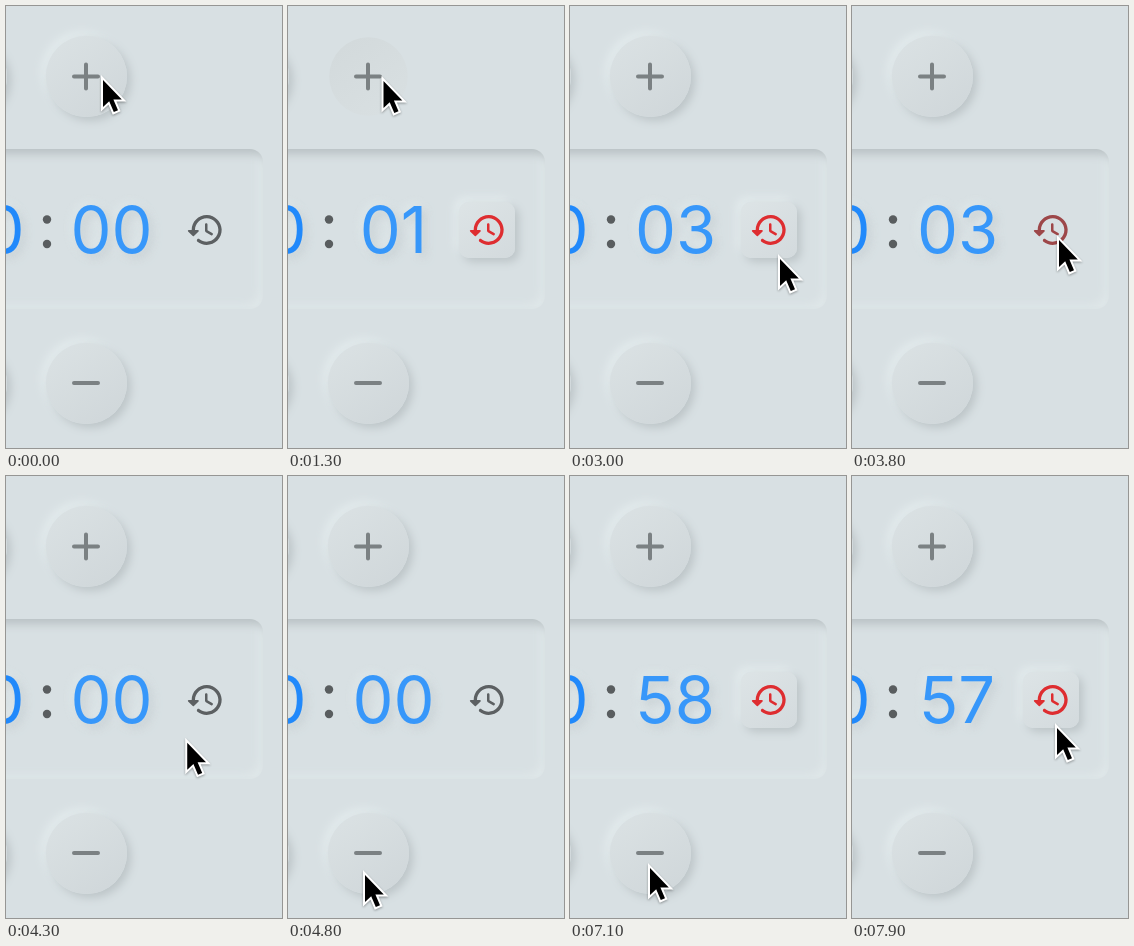
Recreate the animation shown at these times as an HTML page. Size 276 by 442 pixels, loop 8 s.

```html
<!DOCTYPE html>
<html lang="en">
<head>
<meta charset="utf-8">
<title>Timer</title>
<style>
  html, body { margin: 0; width: 100%; height: 100%; overflow: hidden; background: #d8e0e3; }
  div, svg { position: absolute; }
  svg { left: 0; top: 0; }
  .panel {
    left: -200px; top: 143px; width: 457px; height: 160px; border-radius: 13px;
    box-shadow: inset 5px 6px 10px -1px #b9c1c4, inset -6px -6px 9px -2px #dfe7e9;
  }
  .round, .flat { width: 81px; height: 81px; border-radius: 50%; }
  .round, .box {
    background: linear-gradient(145deg, #dbe2e4, #cfd6d9);
    box-shadow: 4px 4px 9px #bdc5c8, -5px -5px 9px #e2eaec;
  }
  .flat { background: linear-gradient(145deg, #d2d9db, #d9e0e2); transform: scale(.97); }
  .box { left: 171px; top: 196px; width: 56px; height: 56px; border-radius: 10px; background: linear-gradient(145deg, #dde4e6, #d3dadd); }
  text { font: 400 65px Inter, "Liberation Sans", sans-serif; text-anchor: middle; }
  .digits { filter: drop-shadow(4px 4px 4px #bcc5c9aa) drop-shadow(-3px -3px 4px #e4ecee99); }
</style>
</head>
<body>
<div class="panel"></div>
<div class="flat" style="left:39.5px;top:30px"></div>
<div class="flat" style="left:39.5px;top:336.5px"></div>
<div class="round" style="left:-80px;top:30px"></div>
<div class="round" style="left:-80px;top:336.5px"></div>
<div class="round" id="plus" style="left:39.5px;top:30px"></div>
<div class="round" id="minus" style="left:39.5px;top:336.5px"></div>
<div class="box" id="box"></div>
<svg width="276" height="442">
  <path d="M68 70.5H92M80 58.5V82.5M68 377H92" stroke="#7b8183" stroke-width="4" stroke-linecap="round"/>
  <g class="digits">
    <text x="-22.5" y="247" fill="#2189fb">00</text>
    <text x="105.5" y="247" fill="#3797fa" id="seconds">00</text>
  </g>
  <g fill="#595d5f"><circle cx="41" cy="213.5" r="4.2"/><circle cx="41" cy="238" r="4.2"/></g>
  <path id="reset" transform="translate(179 204) scale(1.667)" d="M13.26 3C8.17 2.86 4 6.95 4 12H2.21c-.45 0-.67.54-.35.85l2.79 2.8c.2.2.51.2.71 0l2.79-2.8c.31-.31.09-.85-.36-.85H6c0-3.9 3.18-7.05 7.1-7 3.72.05 6.85 3.18 6.9 6.9.05 3.91-3.1 7.1-7 7.1-1.61 0-3.1-.55-4.28-1.48-.4-.31-.96-.28-1.32.08-.42.42-.39 1.13.08 1.49C9 20.29 10.91 21 13 21c5.05 0 9.14-4.17 9-9.26-.13-4.69-4.05-8.61-8.74-8.74zm-.51 5c-.41 0-.75.34-.75.75v3.68c0 .35.19.68.49.86l3.12 1.85c.36.21.82.09 1.03-.26.21-.36.09-.82-.26-1.03l-2.88-1.71v-3.4c0-.4-.34-.74-.75-.74z"/>
  <g id="cursor" style="filter:drop-shadow(0 1px 1px #0005)">
    <path d="M2 4V31L8.2 25.2L12.8 36L17 34.2L12.4 23.6H20.8Z" stroke="#fff" stroke-width="4" paint-order="stroke"/>
  </g>
</svg>
<script>
const $ = id => document.getElementById(id);
const LOOP = 8000, STEP = 100;
const ramp = (t, a, b) => Math.min(1, Math.max(0, (t - a) / (b - a)));
const smooth = p => p * p * (3 - 2 * p);

// [time, x, y] of the pointer tip
const path = [
  [0, 95, 70], [100, 93.5, 71], [2400, 93.5, 71], [3000, 208, 249], [3300, 205, 230],
  [4100, 205, 230], [4800, 75, 395], [5000, 75, 394], [5200, 78, 388],
  [7400, 78, 388], [7900, 203, 248]
];
const values = [[0, '00'], [600, '01'], [1400, '02'], [2100, '03'], [3900, '00'], [5600, '59'], [6500, '58'], [7300, '57']];
const presses = {
  plus: [[400, 600], [1200, 1400], [1900, 2100]],
  minus: [[5400, 5600], [6300, 6500], [7150, 7300]]
};

function pointer(t) {
  const i = path.findIndex(k => k[0] > t);
  if (i < 0) return path.at(-1).slice(1);
  const [a, x, y] = path[i - 1], [b, u, v] = path[i];
  const p = smooth(ramp(t, a, b));
  return [x + (u - x) * p, y + (v - y) * p];
}

function draw(now) {
  const t = Math.floor(now % LOOP / STEP) * STEP;
  for (const id in presses) {
    const down = presses[id].reduce((s, [a, b]) => s + ramp(t, a, a + 100) * (1 - ramp(t, b, b + 200)), 0);
    $(id).style.opacity = 1 - down;
  }
  const shown = ramp(t, 500, 700) + ramp(t, 5500, 5700);
  const red = shown - ramp(t, 3650, 3950);
  $('box').style.opacity = shown - ramp(t, 3600, 3800);
  const mix = (a, b) => Math.round(a + (b - a) * red);
  $('reset').setAttribute('fill', `rgb(${mix(92, 222)},${mix(96, 45)},${mix(98, 48)})`);
  $('seconds').textContent = values.findLast(v => v[0] <= t)[1];
  $('cursor').setAttribute('transform', `translate(${pointer(t)})`);
}

const start = performance.now();
function frame() {
  draw(performance.now() - start);
  requestAnimationFrame(frame);
}
frame();
</script>
</body>
</html>
```
